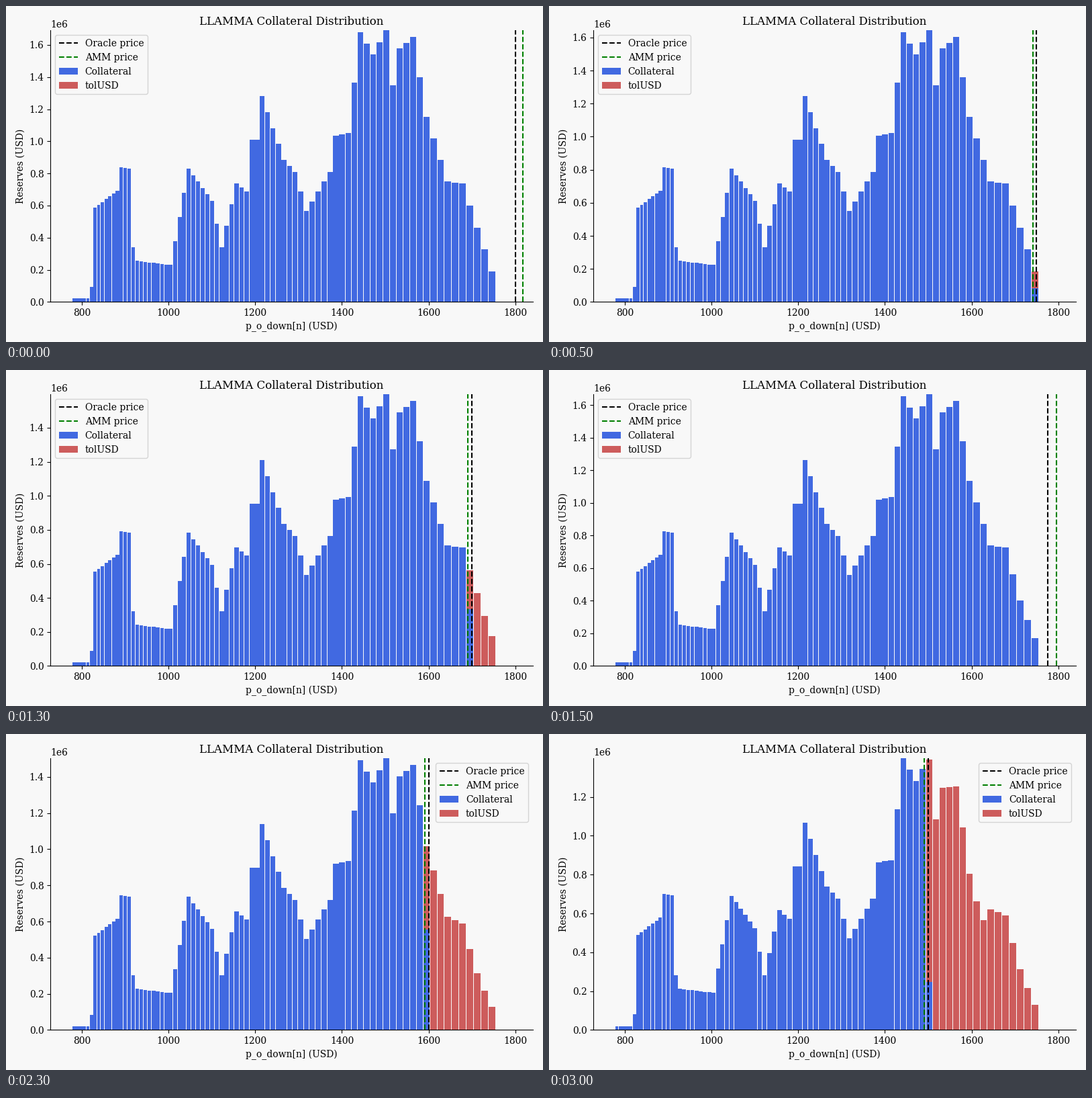
A matplotlib script that plays this animation: 800 by 500 pixels, repeating every 3.5 s.

```python
import numpy as np
import matplotlib.pyplot as plt
from matplotlib.animation import FuncAnimation

plt.rcParams.update({
    "font.family": "DejaVu Serif",
    "figure.facecolor": "#f8f8f8",
    "axes.facecolor": "#f8f8f8",
    "axes.spines.top": False,
    "axes.spines.right": False,
})

A = 100  # amplification: neighbouring bands differ by 1/A in price
BASE_PRICE = 1800
BANDS = 83

# Deposit profile: (band, thousands of USD at the base price)
PROFILE = [
    (1, 0), (2, 190), (6, 736), (8, 750), (11, 1150), (13, 1650),
    (15, 1577), (16, 1347), (17, 1690), (19, 1540), (21, 1678), (23, 1050),
    (25, 1035), (26, 810), (30, 565), (32, 810), (34, 885), (38, 1280),
    (39, 1010), (40, 1010), (41, 686), (43, 740), (46, 340), (48, 630),
    (53, 830), (57, 230), (65, 255), (66, 340), (67, 832), (69, 840),
    (70, 694), (76, 586), (77, 96), (78, 21),
]

# (oracle price, AMM price after arbitrage)
PRICES = [(1800, 1817), (1750, 1741), (1700, 1690.5), (1775, 1796.5),
          (1600, 1591.5), (1650, 1660.5), (1500, 1490.5)]

p_up = BASE_PRICE * (1 - 1 / A) ** np.arange(BANDS)
p_down = p_up * (1 - 1 / A)


def trade(x, y, oracle, price):
    """Move every band's stablecoin x and collateral y to the AMM price."""
    # y0 solves  oracle*A*y0^2 - b*y0 - x*y = 0
    b = p_up / oracle * (A - 1) * x + oracle ** 2 / p_up * A * y
    y0 = (b + np.sqrt(b ** 2 + 4 * oracle * A * x * y)) / (2 * oracle * A)
    f = A * y0 * oracle ** 2 / p_up
    g = (A - 1) * y0 * p_up / oracle
    root = np.sqrt(oracle) * A * y0
    p = np.clip(price, oracle ** 3 / p_up ** 2, oracle ** 3 / p_down ** 2)
    return root * np.sqrt(p) - f, root / np.sqrt(p) - g


def simulate():
    """Stablecoin and collateral value per band, in USD, for every price step."""
    x = np.zeros(BANDS)
    y = np.interp(np.arange(BANDS), *zip(*PROFILE)) * 1e3 / BASE_PRICE
    states = []
    for oracle, price in PRICES:
        x, y = trade(x, y, oracle, price)
        states.append((x, y * oracle))
    return states


states = simulate()
widths = 0.9 * (p_up - p_down)

fig, ax = plt.subplots(figsize=(8, 5), dpi=100)
stable, coll = states[0]
coll_bars = ax.bar(p_down, coll, widths, color="royalblue", label="Collateral")
stable_bars = ax.bar(p_down, stable, widths, bottom=coll,
                     color="indianred", label="tolUSD")
oracle_line = ax.axvline(PRICES[0][0], color="black", ls="--", label="Oracle price")
amm_line = ax.axvline(PRICES[0][1], color="green", ls="--", label="AMM price")

ax.set_title("LLAMMA Collateral Distribution")
ax.set_xlabel("p_o_down[n] (USD)")
ax.set_ylabel("Reserves (USD)")
legend = ax.legend(loc="upper left")


def update(i):
    oracle, price = PRICES[i]
    stable, coll = states[i]
    for low, high, c, s in zip(coll_bars, stable_bars, coll, stable):
        low.set_height(c)
        high.set_y(c)
        high.set_height(s)
    oracle_line.set_xdata([oracle] * 2)
    amm_line.set_xdata([price] * 2)
    ax.set_ylim(0, (coll + stable).max())
    # the tall bars reach under the left legend once the price is low
    legend.set_loc("upper right" if oracle <= 1600 else "upper left")
    fig.tight_layout()


anim = FuncAnimation(fig, update, frames=len(PRICES), interval=500,
                     repeat=True, repeat_delay=0)
plt.show()
```
